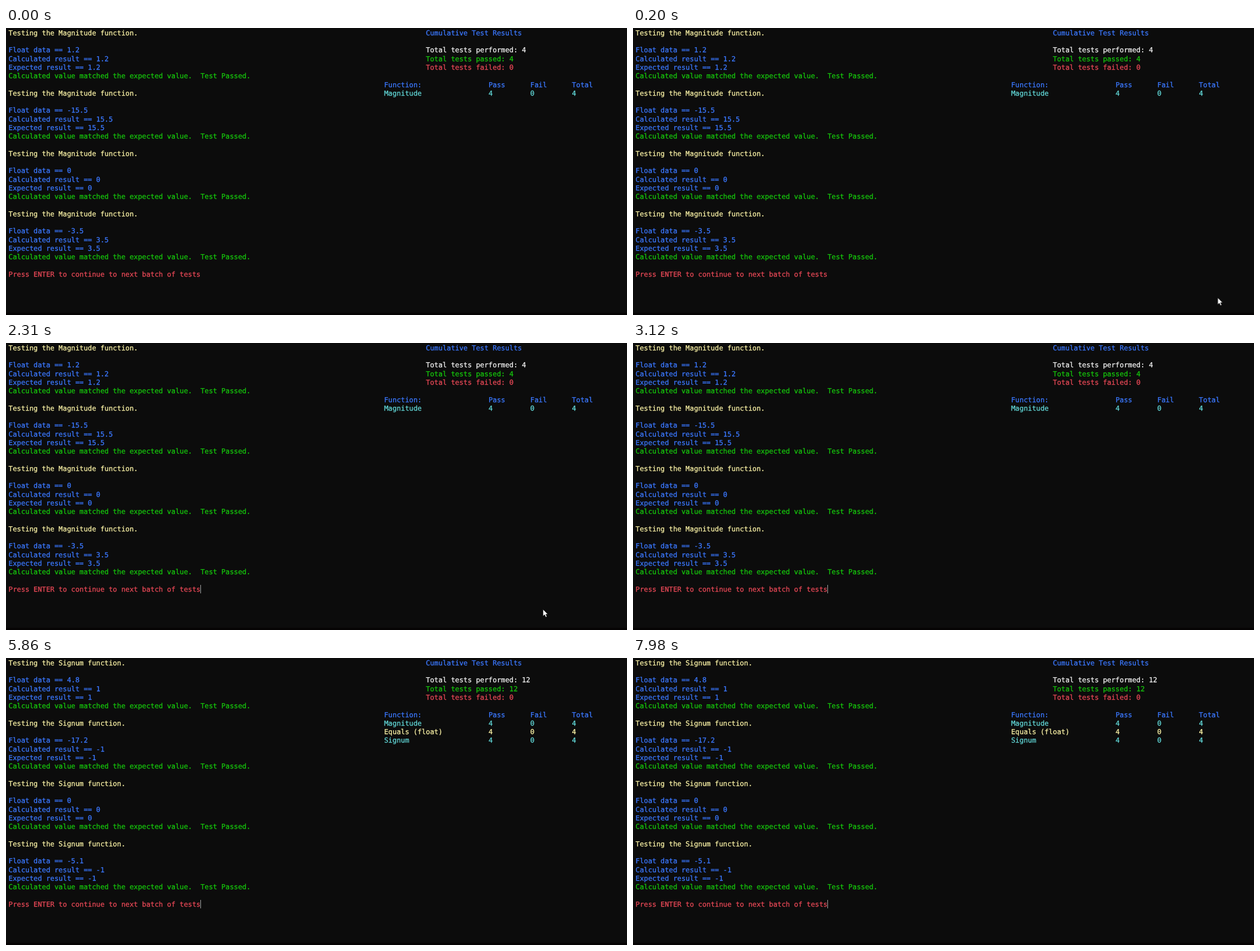
An HTML page for the animation above (8 s loop, 1099 by 509 pixels).

```html
<!DOCTYPE html>
<html lang="en">
<head>
<meta charset="utf-8">
<title>Console test run</title>
<style>
  html, body { margin: 0; width: 100%; height: 100%; overflow: hidden; background: #0c0c0c; }
  svg { display: block; width: 1099px; height: 509px; }
  text {
    font: 12.27px "DejaVu Sans Mono", "Noto Sans Mono", monospace;
    font-variant-ligatures: none;
    text-rendering: geometricPrecision;
    white-space: pre;
    fill: currentColor;
    stroke: currentColor;
    stroke-width: .3px;
  }
  .blue { color: #3b78ff; }
  .yellow { color: #f9f1a5; }
  .green { color: #16c60c; }
  .red { color: #e74856; }
  .cyan { color: #61d6d6; }
  .white { color: #f2f2f2; }

  .page, #caret, #mouse { opacity: 0; animation: 8s step-end infinite; }
  #page0 { animation-name: first; }
  #page1 { animation-name: second; }
  #page2 { animation-name: third; }
  #caret { animation-name: blink; }
  #mouse { animation-name: point; }

  @keyframes first { 0% { opacity: 1; } 40%, 100% { opacity: 0; } }
  @keyframes second { 0% { opacity: 0; } 40% { opacity: 1; } 73.25%, 100% { opacity: 0; } }
  @keyframes third { 0% { opacity: 0; } 73.25%, 100% { opacity: 1; } }
  @keyframes blink {
    0%, 35.625%, 40%, 80.5%, 93.75% { opacity: 0; }
    28.875%, 39%, 73.25%, 87.125%, 99.75%, 100% { opacity: 1; }
  }
  @keyframes point {
    0% { opacity: 0; transform: translate(1037px, 482px); }
    1.75% { opacity: 1; transform: translate(1037px, 482px); }
    2.5% { opacity: 1; transform: translate(1034.5px, 478px); }
    24.75% { opacity: 1; transform: translate(1003.5px, 461px); }
    25.625% { opacity: 1; transform: translate(915.5px, 483px); }
    26.375% { opacity: 1; transform: translate(956px, 453px); }
    28.875% { opacity: 1; transform: translate(950px, 472px); }
    30% { opacity: 1; transform: translate(956px, 479px); }
    38.125%, 100% { opacity: 0; transform: translate(956px, 479px); }
  }
</style>
</head>
<body>
<svg viewBox="0 0 1099 509" xmlns="http://www.w3.org/2000/svg">
  <rect width="1099" height="509" fill="#0c0c0c"/>
  <rect y="505" width="1099" height="4" fill="#060404"/>
  <g id="page0" class="page"></g>
  <g id="page1" class="page"></g>
  <g id="page2" class="page"></g>
  <rect id="caret" x="344" y="429" width="1" height="15" fill="#a8a8a8"/>
  <path id="mouse" d="M.4 .4V12.4L3.2 9.8L5.2 14.2L7.2 13.3L5.3 9H8.8Z" fill="#fff" stroke="#000" stroke-width=".5"/>
</svg>
<script>
  const CELL_W = 7.386, CELL_H = 15.286, LEFT = 4.5, BASE = 12.8;

  const unary = ["Float data", "Calculated result", "Expected result"];
  const binary = ["Float data one", "Float data two", "Precision level", "Calculated result", "Expected result"];

  const suites = [
    { name: "Magnitude", labels: unary, tint: "cyan",
      cases: ["1.2 1.2 1.2", "-15.5 15.5 15.5", "0 0 0", "-3.5 3.5 3.5"] },
    { name: "Equals (float)", labels: binary, tint: "yellow",
      cases: ["1.2 1.2 1e-05 true true", "-2.5 -2.6 0.01 false false",
              "-2.5 -2.6 0.1 true true", "3.14159 3.1416 0.001 true true"] },
    { name: "Signum", labels: unary, tint: "cyan",
      cases: ["4.8 1 1", "-17.2 -1 -1", "0 0 0", "-5.1 -1 -1"] }
  ];

  function print(page, col, row, color, str) {
    const t = document.createElementNS("http://www.w3.org/2000/svg", "text");
    t.setAttribute("x", LEFT + col * CELL_W);
    t.setAttribute("y", BASE + row * CELL_H);
    t.setAttribute("class", color);
    t.textContent = str;
    page.append(t);
  }

  function printLog(page, { name, labels, cases }) {
    let row = 0;
    for (const values of cases.map(c => c.split(" "))) {
      print(page, 0, row, "yellow", `Testing the ${name} function.`);
      row += 2;
      labels.forEach((label, i) => print(page, 0, row++, "blue", `${label} == ${values[i]}`));
      print(page, 0, row, "green", "Calculated value matched the expected value.  Test Passed.");
      row += 2;
    }
    print(page, 0, row, "red", "Press ENTER to continue to next batch of tests");
  }

  function printRow(page, row, color, cells) {
    cells.forEach((cell, i) => print(page, [90, 115, 125, 135][i], row, color, cell));
  }

  function printSummary(page, done) {
    const total = done.length * 4;
    print(page, 100, 0, "blue", "Cumulative Test Results");
    print(page, 100, 2, "white", `Total tests performed: ${total}`);
    print(page, 100, 3, "green", `Total tests passed: ${total}`);
    print(page, 100, 4, "red", "Total tests failed: 0");
    printRow(page, 6, "blue", ["Function:", "Pass", "Fail", "Total"]);
    done.forEach((s, i) => printRow(page, 7 + i, s.tint, [s.name, 4, 0, 4]));
  }

  suites.forEach((suite, i) => {
    const page = document.getElementById("page" + i);
    printLog(page, suite);
    printSummary(page, suites.slice(0, i + 1));
  });
</script>
</body>
</html>
```
